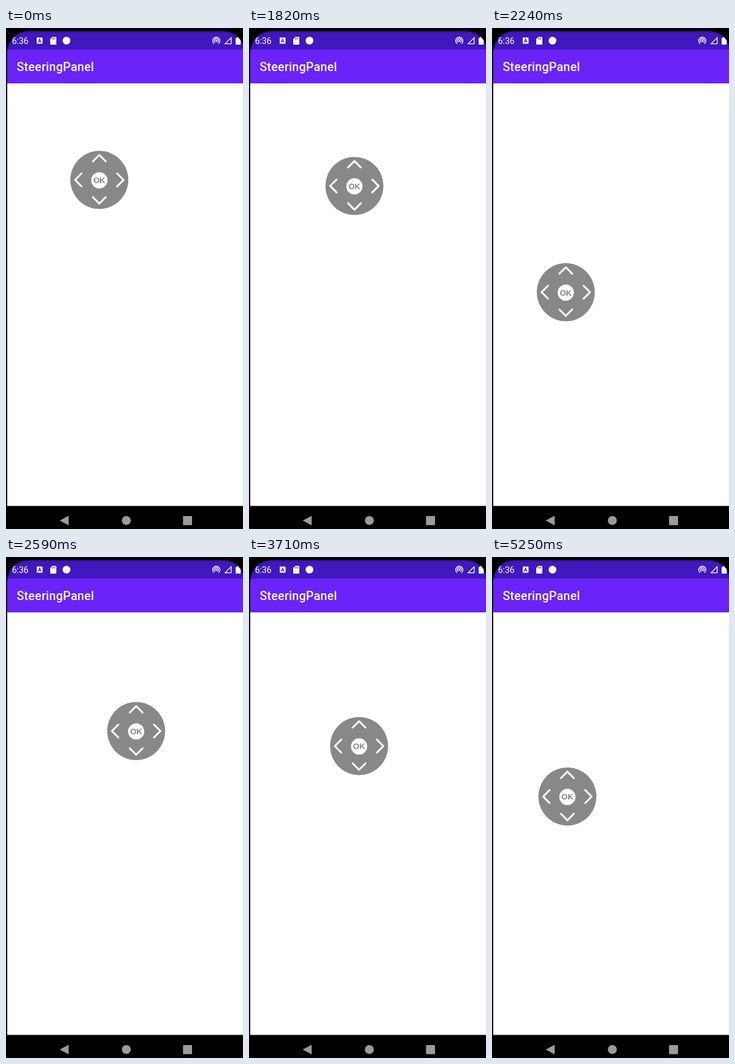
Recreate the animation shown at these times as an HTML page. Size 386 by 814 pixels, loop 5320 ms.

```html
<!DOCTYPE html>
<html lang="en">
<head>
<meta charset="utf-8">
<title>Direction pad</title>
<style>
  html, body { margin: 0; width: 100%; height: 100%; overflow: hidden; background: #000; }
  svg { display: block; width: 100%; height: 100%; }
  text { font-family: Roboto, sans-serif; fill: #fff; }
  .ok { font: bold 13px "Liberation Sans", Arial, sans-serif; fill: #858585; text-anchor: middle; }
</style>
</head>
<body>
<svg viewBox="0 0 386 814">
  <defs>
    <clipPath id="screen"><rect x="2" y="5" width="386" height="830" rx="34"/></clipPath>
    <clipPath id="bars"><rect width="386" height="35"/></clipPath>
    <filter id="soft" x="-5%" y="-5%" width="110%" height="110%"><feGaussianBlur stdDeviation="1.2"/></filter>
    <path id="chevron" d="M-10.5 -29L0 -39.5L10.5 -29"/>
  </defs>

  <rect width="386" height="814" fill="#000"/>
  <g clip-path="url(#screen)">
    <rect x="2" y="5" width="384" height="30" fill="#4018bd"/>
    <rect x="2" y="35" width="384" height="55" fill="#6a23f8"/>
    <rect x="2" y="90" width="384" height="686.5" fill="#fff"/>
    <g clip-path="url(#bars)">
      <rect x="2" y="5" width="386" height="830" rx="34" fill="none" stroke="#000"
            stroke-opacity=".35" stroke-width="3" filter="url(#soft)"/>
    </g>
    <path d="M374 17Q374 16 375 16H376.3V14.5H380V16H381.3Q382.3 16 382.3 17V26Q382.3 27 381.3 27H375Q374 27 374 26Z" fill="#fff"/>
  </g>

  <!-- status bar -->
  <text x="9.7" y="25.8" font-size="14">6:36</text>
  <rect x="50" y="15.5" width="9.5" height="10" rx="1" fill="#fff"/>
  <path d="M52.5 23.5L54.75 17.8L57 23.5M53.4 21.8H56.1" fill="none" stroke="#4018bd" stroke-width="1.2"/>
  <path d="M75.3 14.5H81Q82 14.5 82 15.5V26Q82 27 81 27H73Q72 27 72 26V18Z" fill="#fff"/>
  <path d="M75.5 16.2V18.6M77.6 16.2V18.6M79.7 16.2V18.6" stroke="#4018bd" stroke-width="1"/>
  <circle cx="98.5" cy="20.5" r="6.3" fill="#fff"/>
  <g fill="none" stroke="#fff" stroke-width="1.3">
    <path d="M339.1 25.7A5.9 5.9 0 1 1 345.9 25.7"/>
    <path d="M340.5 23.4A3.3 3.3 0 1 1 344.5 23.4"/>
    <path d="M356.8 25.7L366.7 15.8V25.7Z"/>
  </g>
  <circle cx="342.5" cy="21" r="1.5" fill="#fff"/>

  <text x="17.5" y="70" font-size="19.6" font-weight="500" letter-spacing=".25">SteeringPanel</text>

  <g id="pad">
    <circle r="47.2" fill="#888"/>
    <g fill="none" stroke="#fff" stroke-width="3" stroke-linecap="round" stroke-linejoin="round">
      <use href="#chevron" y="-1"/>
      <use href="#chevron" transform="rotate(90)"/>
      <use href="#chevron" y="1" transform="rotate(180)"/>
      <use href="#chevron" transform="rotate(270)"/>
    </g>
    <circle cy=".6" r="13.2" fill="#fff"/>
    <text class="ok" y="5.2">OK</text>
  </g>

  <!-- navigation bar -->
  <g fill="#9b9b9b">
    <path d="M87.5 800.2L102 792.4V808Z"/>
    <circle cx="196" cy="800.2" r="7.3"/>
    <rect x="288.3" y="793" width="14.7" height="14.7" rx="1"/>
  </g>
</svg>
<script>
  const LOOP = 5320, STEP = 70;
  const pad = document.getElementById("pad");

  // Turning points of the two drags, with rests between them
  const keys = [
    { t: 1470, x: 152, y: 246.8 },
    { t: 1820, x: 171.7, y: 256.6 },
    { t: 2170, x: 126, y: 442 },
    { t: 2240, x: 120.2, y: 429.3 },
    { t: 2590, x: 212, y: 282.8 },
    { t: 2730, x: 217, y: 276 },
    { t: 3290, x: 217, y: 276 },
    { t: 3710, x: 179.3, y: 307.2 },
    { t: 3850, x: 126.5, y: 385.5 },
    { t: 3920, x: 122.8, y: 389.2 }
  ];
  const last = keys.length - 1;

  const slope = (i, axis) =>
    (keys[i + 1][axis] - keys[i][axis]) / (keys[i + 1].t - keys[i].t);

  // Harmonic mean of both sides; zero at ends and extremes, so no overshoot
  function tangent(i, axis) {
    if (i === 0 || i === last) return 0;
    const a = slope(i - 1, axis), b = slope(i, axis);
    return a * b > 0 ? 2 * a * b / (a + b) : 0;
  }

  function along(axis, time) {
    const t = Math.min(Math.max(time, keys[0].t), keys[last].t);
    const i = Math.max(0, keys.findIndex(k => k.t >= t) - 1);
    const from = keys[i], to = keys[i + 1], span = to.t - from.t;
    const s = (t - from.t) / span, r = 1 - s;
    return from[axis] * r * r * (1 + 2 * s) + to[axis] * s * s * (3 - 2 * s)
      + span * s * r * (tangent(i, axis) * r - tangent(i + 1, axis) * s);
  }

  function draw(time) {
    const t = Math.floor((time % LOOP) / STEP) * STEP;
    const x = along("x", t), y = along("y", t);
    pad.setAttribute("transform", `translate(${x.toFixed(2)} ${y.toFixed(2)})`);
  }

  const start = performance.now();
  function tick() {
    draw(performance.now() - start);
    requestAnimationFrame(tick);
  }
  tick();
</script>
</body>
</html>
```
